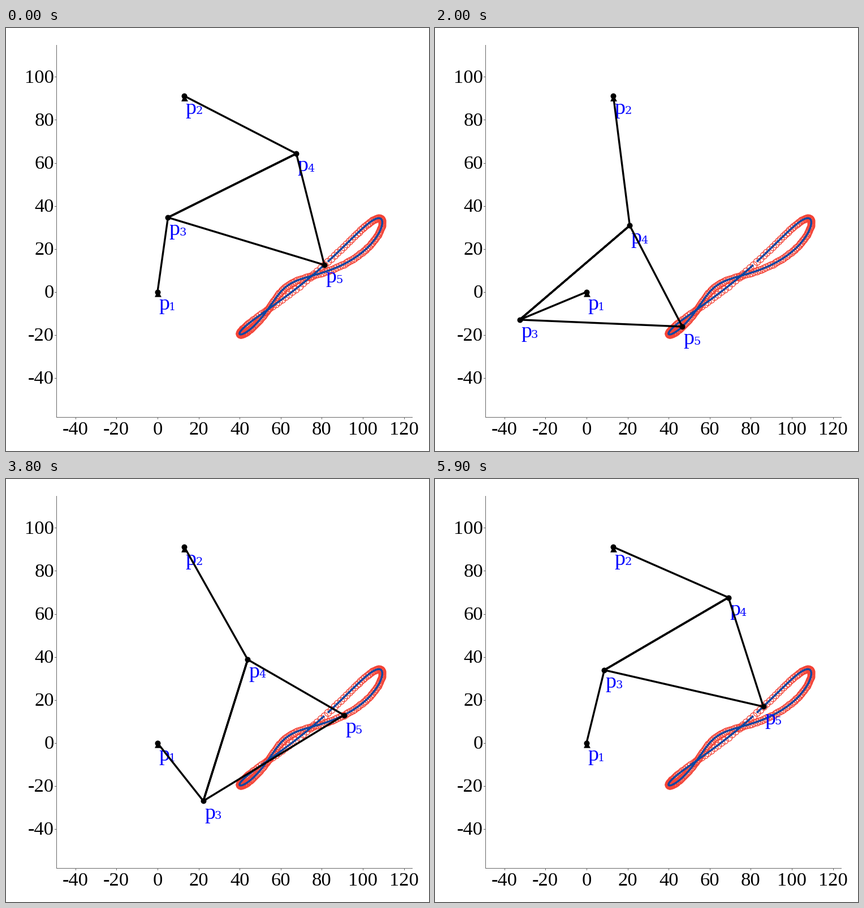
A matplotlib script for the animation above (6000 ms loop, 748x748 px).

```python
import numpy as np
import matplotlib.pyplot as plt
from matplotlib.animation import FuncAnimation

SIZE, DPI = 748, 100
PT = 72 / DPI                      # points per pixel
FRAMES = 60
START = np.radians(81.62)

# Four-bar linkage with a rigid triangular coupler (p3, p4, p5)
CRANK, ROCKER = 35.0, 60.75
SIDE_34, SIDE_35, SIDE_45 = 69.2, 79.27, 53.5
P1, P2 = 0j, 13.08 + 91.1j
CORNER = np.arccos((SIDE_34**2 + SIDE_35**2 - SIDE_45**2)
                   / (2 * SIDE_34 * SIDE_35))

RED, BLUE, LABEL = "#f44336", "#0d47a1", "#0000ff"
AXIS = "#666666"


def to_px(z):
    """Data point as a complex number -> stage pixels."""
    return 267.9 + 3.631 * np.real(z), 466.8 - 3.804 * np.imag(z)


def linkage(theta):
    p3 = CRANK * np.exp(1j * theta)
    base = P2 - p3
    d = abs(base)
    lean = np.arccos((SIDE_34**2 + d**2 - ROCKER**2) / (2 * SIDE_34 * d))
    heading = base / d * np.exp(-1j * lean)
    p4 = p3 + SIDE_34 * heading
    p5 = p3 + SIDE_35 * heading * np.exp(-1j * CORNER)
    return p3, p4, p5


fig = plt.figure(figsize=(SIZE / DPI, SIZE / DPI), dpi=DPI, facecolor="white")
ax = fig.add_axes([0, 0, 1, 1])
ax.set_xlim(0, SIZE)
ax.set_ylim(SIZE, 0)
ax.axis("off")


def text(x, y, s, size, family="Liberation Serif", **kw):
    return ax.text(x, y, s, fontsize=size * PT, family=family,
                   va="baseline", **kw)


def draw_axes():
    left, right, top, bottom = 89.5, 718, 29.5, 688
    style = dict(color=AXIS, lw=1 * PT)
    ax.plot([left, left, right], [top, bottom, bottom], **style)
    for v in range(-40, 121, 20):
        x, _ = to_px(v)
        ax.plot([x, x], [bottom, bottom + 3], **style)
        text(x, 719, str(v), 34.5, ha="center")
    for v in range(-40, 101, 20):
        _, y = to_px(1j * v)
        ax.plot([left - 3, left], [y, y], **style)
        text(85.2, y + 10.5, str(v), 34.5, ha="right")


def draw_trace():
    angles = START + np.radians(np.arange(0, 360, 2))
    x, y = to_px(linkage(angles)[2])
    ax.plot(x, y, "o", ms=12.4 * PT, mfc="none", mec=RED, mew=1.3 * PT,
            zorder=3)
    ax.plot(x, y, color=BLUE, lw=3.4 * PT, solid_capstyle="butt", zorder=4)


def make_label(n):
    return (text(0, 0, "p", 38, color=LABEL, zorder=5),
            text(0, 0, str(n), 19.5, "DejaVu Serif", color=LABEL, zorder=5))


def place_label(label, x, y):
    letter, digit = label
    letter.set_position((x + 2.3, y + 31.3))
    digit.set_position((x + 20, y + 32))


draw_axes()
draw_trace()

anchor_x, anchor_y = to_px(np.array([P1, P2]))
ax.plot(anchor_x, anchor_y + 2.5, "k^", ms=11 * PT, mew=0.5 * PT, zorder=6)

bars, = ax.plot([], [], color="black", lw=3.4 * PT, zorder=7,
                solid_joinstyle="round", solid_capstyle="round")
joints, = ax.plot([], [], "ko", ms=10 * PT, mew=0, zorder=8)
labels = [make_label(n) for n in range(1, 6)]


def update(i):
    p3, p4, p5 = linkage(START + 2 * np.pi * i / FRAMES)
    bars.set_data(*to_px(np.array([P1, p3, p5, p4, p3, p4, P2])))
    x, y = to_px(np.array([P1, P2, p3, p4, p5]))
    joints.set_data(x, y)
    for label, px, py in zip(labels, x, y):
        place_label(label, px, py)
    return [bars, joints]


anim = FuncAnimation(fig, update, frames=FRAMES, interval=100, repeat=True,
                     repeat_delay=0, blit=False)
plt.show()
```
